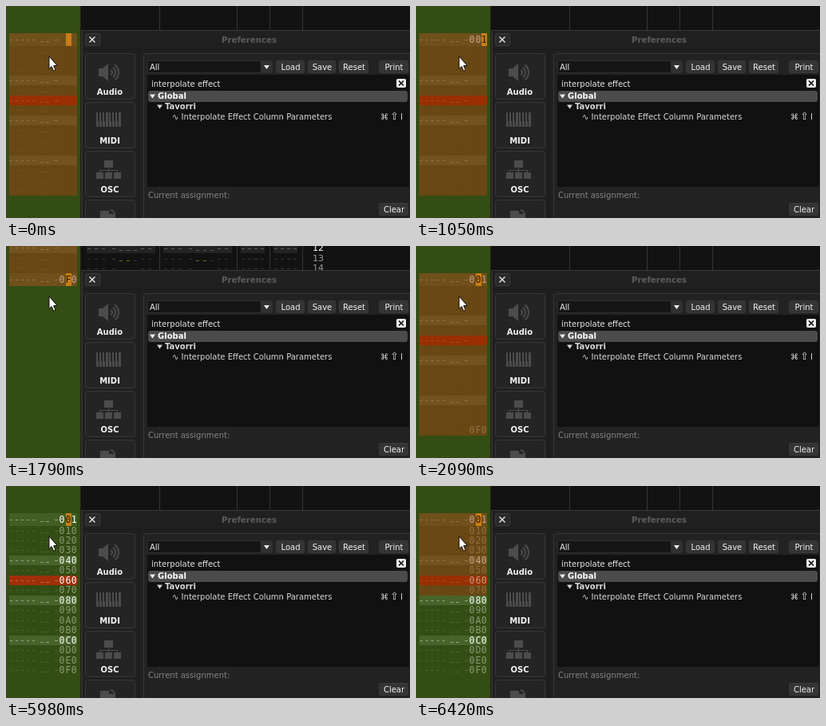
An HTML page with a canvas for the animation above (8000 ms loop, 506 by 265 pixels).

```html
<!DOCTYPE html>
<html lang="en">
<head>
<meta charset="utf-8">
<style>
html, body { margin: 0; width: 100%; height: 100%; overflow: hidden; background: #121212; }
canvas { display: block; }
</style>
</head>
<body>
<canvas id="stage" width="506" height="265"></canvas>
<script>
const ctx = document.getElementById('stage').getContext('2d');
const LOOP = 8000, ROWS = 16, PITCH = 12.47, CURSOR_TOP = 34, CURSOR_BOTTOM = 50;
const CELLS = [70, 78, 85.3], CELL_EDGES = [67, 75, 82];

function rect(x, y, w, h, color) {
  ctx.fillStyle = color;
  ctx.fillRect(x, y, w, h);
}

function box(x, y, w, h, fill, stroke, radius = 2) {
  ctx.beginPath();
  ctx.roundRect(x + .5, y + .5, w - 1, h - 1, radius);
  ctx.fillStyle = fill;
  ctx.fill();
  ctx.strokeStyle = stroke;
  ctx.lineWidth = 1;
  ctx.stroke();
}

function text(str, x, y, color, { align = 'left', bold = false, size = 10, mono = false } = {}) {
  const family = mono ? '"DejaVu Sans Mono", monospace' : '"DejaVu Sans", sans-serif';
  ctx.font = `${bold ? 'bold ' : ''}${size}px ${family}`;
  ctx.textAlign = align;
  ctx.fillStyle = color;
  ctx.fillText(str, x, y);
}

function polygon(points, color) {
  ctx.beginPath();
  points.forEach(([x, y]) => ctx.lineTo(x, y));
  ctx.closePath();
  ctx.fillStyle = color;
  ctx.fill();
}

function cross(x, y, r, color, width) {
  ctx.beginPath();
  ctx.moveTo(x - r, y - r); ctx.lineTo(x + r, y + r);
  ctx.moveTo(x + r, y - r); ctx.lineTo(x - r, y + r);
  ctx.strokeStyle = color;
  ctx.lineWidth = width;
  ctx.stroke();
}

const triangle = (x, y, color) => polygon([[x, y], [x + 7, y], [x + 3.5, y + 5]], color);

function stateAt(t) {
  return {
    current: t >= 1190 && t < 2090 ? ROWS - 1 : 0,
    cell: t < 600 || t >= 1790 ? 1 : 2,
    hasValue: row => row === 0 ? t >= 1050 : row === ROWS - 1 ? t >= 1790 : t >= 3440,
    selected: t < 5980 ? ROWS : t < 6280 ? 0 : t < 6420 ? 4 : 8
  };
}

// The current row is taller than the rest and stays in place while the others scroll.
function rowTop(row, current) {
  const d = row - current;
  return Math.floor(d > 0 ? CURSOR_BOTTOM + PITCH * (d - 1) : CURSOR_TOP + PITCH * d);
}

function drawRow(row, { current, cell, hasValue, selected }) {
  const top = rowTop(row, current);
  const height = rowTop(row + 1, current) - top;
  const isCurrent = row === current, isPlaying = row === 6;
  const bright = isCurrent || isPlaying || row % 4 === 0;
  const middle = isCurrent ? 42 : top + 6;
  if (bright) rect(4, top, 85, height, isPlaying ? '#a02e06' : isCurrent ? '#435e23' : '#48642b');

  const dash = isPlaying ? '#c06a48' : bright ? '#93a080' : '#4b632e';
  for (let i = 0; i < 5; i++) rect(5 + i * 7, middle, 3, 1, dash);
  rect(43, middle + 2, 4, 1, dash);
  rect(50, middle + 2, 4, 1, dash);
  rect(61, middle, 4, 1, dash);

  const value = row ? (row * 16).toString(16).toUpperCase().padStart(3, '0') : '001';
  const drawDigit = (i, color) =>
    text(value[i], CELLS[i], middle + 4, color, { align: 'center', size: 11.5, mono: true });
  if (hasValue(row)) CELLS.forEach((_, i) => drawDigit(i, bright ? '#ffffff' : '#8b9a74'));

  if (row < selected) {
    rect(4, top, 85, height, isPlaying ? 'rgba(148,48,0,.5)' : 'rgba(156,66,20,.5)');
  }
  if (isCurrent) {
    rect(CELL_EDGES[cell], top, 7, height, '#cb7d14');
    if (hasValue(row)) drawDigit(cell, '#2b1803');
  }
}

function drawTrackLine(row, y) {
  const color = row === 12 ? '#5a5a5a' : '#343434';
  for (const x of [102, 198]) {
    if (row === 12) rect(x - 1, 0, 86, 9, '#232323');
    for (let i = 0; i < 9; i++) {
      const accent = row === 13 && (i === 4 || i === 5);
      rect(x + i * 9 + (i > 2 ? 4 : 0), y + (i > 3 && i < 7 ? 2 : 0), 4, 1, accent ? '#77701a' : color);
    }
  }
  for (const x of [295, 336]) {
    if (row === 12) rect(x - 1, 0, 30, 9, '#232323');
    for (let i = 0; i < 4; i++) rect(x + i * 8, y, 4, 1, color);
  }
  text(row, 384, y + 3, row === 12 ? '#ffffff' : '#9b9b9b', { size: 11 });
}

function drawTracks(current) {
  rect(93, 0, 413, 30, '#121212');
  if (current) {
    for (let row = 12; row < 15; row++) drawTrackLine(row, rowTop(row, current) + 7);
  }
  for (const x of [192, 289, 330, 371]) rect(x, 0, 1, 30, '#353535');
}

function drawIcons() {
  const color = '#4c4c4c';
  polygon([[116, 78], [121, 78], [128, 72], [128, 94], [121, 88], [116, 88]], color);
  ctx.strokeStyle = color;
  ctx.lineWidth = 2;
  for (const r of [4, 8, 12]) {
    ctx.beginPath();
    ctx.arc(129, 83, r, -.9, .9);
    ctx.stroke();
  }

  for (let i = 0; i < 8; i++) {
    rect(113 + i * 4, 133, 3, 18, color);
    if (i % 4 !== 3) rect(115 + i * 4, 133, 3, 11, '#222222');
  }

  rect(123, 193, 11, 9, color);
  rect(128, 202, 1, 4, color);
  rect(118, 205, 22, 1, color);
  for (const x of [113, 124, 135]) {
    rect(x + 4, 205, 1, 4, color);
    rect(x, 208, 9, 8, color);
  }

  rect(118, 256, 11, 9, color);
  rect(126, 260, 11, 5, color);
  ctx.beginPath();
  ctx.arc(130, 261, 6, -1.4, 0);
  ctx.stroke();
}

function button(label, x, y, w) {
  box(x, y, w, 16, '#343434', '#383838');
  text(label, x + w / 2 + .5, y + 12, '#f4f4f4', { align: 'center' });
}

function drawDialog() {
  rect(94, 30, 412, 235, '#202020');
  rect(94, 30, 412, 1, '#383838');
  rect(93, 0, 1, 265, '#1a2410');
  rect(94, 30, 2, 235, '#303030');
  text('Preferences', 304.5, 46, '#5c5c5c', { align: 'center', bold: true, size: 10.2 });
  box(99, 34, 19, 16, '#2a2a2a', '#3c3c3c');
  cross(108, 42, 3.5, '#eeeeee', 1.4);

  rect(96, 54, 410, 1, '#191919');
  ['Audio', 'MIDI', 'OSC', ''].forEach((label, i) => {
    const y = 59 + i * 61;
    box(99, y, 63, 58, '#242424', '#373737', 3);
    text(label, 130, y + 52, '#f2f2f2', { align: 'center', bold: true });
  });
  drawIcons();
  rect(166, 55, 1, 210, '#191919');

  box(172, 59, 345, 220, '#222222', '#383838', 3);
  box(177, 68, 157, 16, '#151515', '#2f2f2f');
  rect(319, 69, 14, 14, '#303030');
  text('All', 180, 80, '#eeeeee');
  triangle(323, 74, '#eeeeee');
  button('Load', 338, 68, 36);
  button('Save', 378, 68, 35);
  button('Reset', 417, 68, 37);
  button('Print', 467, 68, 37);

  rect(177, 86, 328, 140, '#111111');
  text('interpolate effect', 182, 101, '#e6e6e6');
  box(489, 91, 12, 11, '#f0f0f0', '#f0f0f0', 1);
  cross(495, 96.5, 3, '#111111', 1.7);
  box(178, 106, 325, 14, '#4b4b4b', '#4b4b4b');
  triangle(180, 110.5, '#eeeeee');
  text('Global', 190, 116, '#ffffff', { bold: true });
  triangle(189, 123.5, '#d8d8d8');
  text('Tavorri', 199, 129, '#d8d8d8', { bold: true });
  text('∿', 208, 142, '#d8d8d8');
  text('Interpolate Effect Column Parameters', 219.6, 142, '#d8d8d8');
  text('⌘', 469, 142, '#d8d8d8');
  text('⇧', 481, 142, '#d8d8d8', { size: 13 });
  text('I', 494, 142, '#d8d8d8');

  text('Current assignment:', 178, 240, '#858585');
  button('Clear', 467, 246, 37);
}

function drawPointer() {
  const points = [[54, 63], [54, 78.5], [57.2, 75.6], [59.7, 81.3], [62, 80.2], [59.6, 74.7], [64, 74.4]];
  polygon(points, '#ffffff');
  ctx.strokeStyle = '#101010';
  ctx.lineWidth = 1;
  ctx.stroke();
}

function draw(now) {
  const state = stateAt(now % LOOP);
  rect(0, 0, 94, 265, '#344d14');
  for (let row = 0; row < ROWS; row++) drawRow(row, state);
  drawTracks(state.current);
  drawDialog();
  drawPointer();
  requestAnimationFrame(draw);
}

requestAnimationFrame(draw);
</script>
</body>
</html>
```
